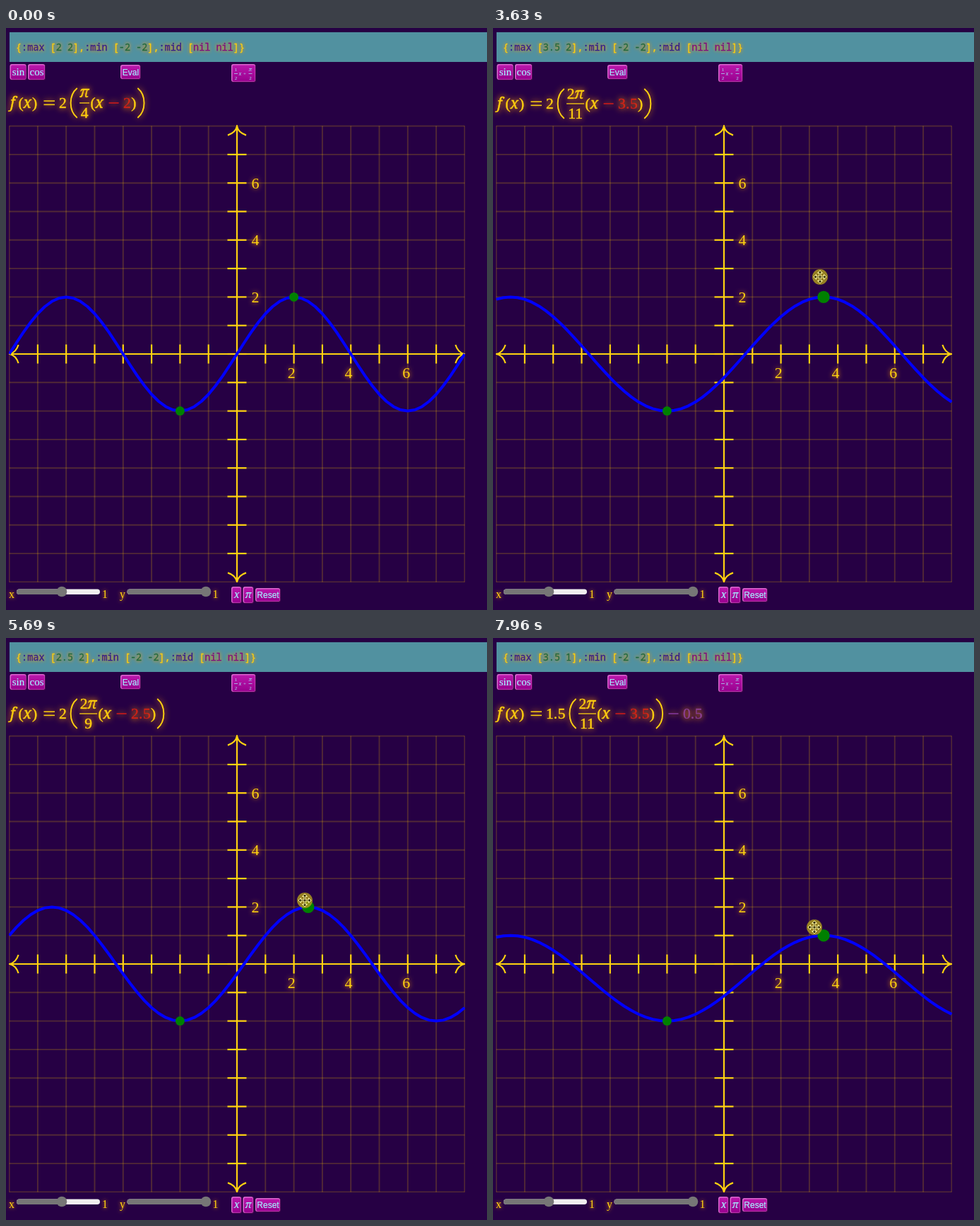
An HTML page with a canvas that plays this animation: 681x823 px, repeating every 8 s.

```html
<!DOCTYPE html>
<html lang="en">
<head>
<meta charset="utf-8">
<title>Sine fitting</title>
<style>
html, body { margin: 0; width: 100%; height: 100%; overflow: hidden; background: #260044; }
canvas { display: block; }
</style>
</head>
<body>
<canvas id="stage" width="681" height="823"></canvas>
<script>
const g = document.getElementById('stage').getContext('2d');
const LOOP = 8000, OX = 327, OY = 461, U = 40.3;
const GOLD = '#ffd310', GLOW = '#ff9a00', RED = '#cc1a1a', PURPLE = '#83389c';
const SERIF = '"Liberation Serif", serif';
const MATH = '21.6px ' + SERIF;
const MATH_IT = 'italic 21px "Noto Serif", serif';
const MIN = { x: -2, y: -2 };
const START = 630, GRAB = 1770, PRESS = 2030, LAG = 70;

// Pointer way points: time, x, y
const PATH = [
  [630, 664, 520], [1310, 453, 398], [1770, 405, 370], [2370, 405, 370],
  [2900, 465, 365], [3290, 468, 360], [3430, 468, 360], [4480, 416, 276],
  [4750, 416, 276], [5690, 423, 371], [6090, 422, 371], [6680, 318, 387],
  [6950, 315, 388], [7960, 455, 409], [8000, 455, 409]
];

function pointer(t) {
  let i = 0;
  while (i < PATH.length - 2 && t >= PATH[i + 1][0]) i++;
  const [t0, x0, y0] = PATH[i], [t1, x1, y1] = PATH[i + 1];
  const u = Math.max(0, Math.min(1, (t - t0) / (t1 - t0)));
  const s = i === 0 ? u : i === 1 ? u * (2 - u) : u * u * (3 - 2 * u);
  return { x: x0 + (x1 - x0) * s, y: y0 + (y1 - y0) * s };
}

function peak(t) {
  if (t < PRESS) return { x: 2, y: 2 };
  const p = pointer(t - LAG);
  const snap = v => Math.round(v * 2) / 2 || 0;
  return { x: snap((p.x - OX) / U + 0.2), y: snap((OY - p.y) / U - 0.38) };
}

const px = x => OX + x * U;
const py = y => OY - y * U;

function glow(blur, color = GLOW) {
  g.shadowBlur = blur;
  g.shadowColor = blur ? color : 'transparent';
}

function text(s, x, y, font, color, align = 'left', heft = 0) {
  g.font = font;
  g.textAlign = align;
  g.fillStyle = color;
  g.fillText(s, x, y);
  if (heft) {
    g.lineWidth = heft;
    g.strokeStyle = color;
    g.strokeText(s, x, y);
  }
}

function line(x0, y0, x1, y1, color, w) {
  g.strokeStyle = color;
  g.lineWidth = w;
  g.beginPath();
  g.moveTo(x0, y0);
  g.lineTo(x1, y1);
  g.stroke();
}

function disc(x, y, r, color) {
  g.fillStyle = color;
  g.beginPath();
  g.arc(x, y, r, 0, 2 * Math.PI);
  g.fill();
}

function round(x, y, w, h, r, color) {
  g.fillStyle = color;
  g.beginPath();
  g.roundRect(x, y, w, h, r);
  g.fill();
}

function header(m) {
  g.fillStyle = '#5191a0';
  g.fillRect(5, 6, 676, 42);
  const parts = [
    ['{', GOLD], [':max ', '#221199'], ['[', GOLD], [`${m.x} ${m.y}`, '#116644'], ['],', GOLD],
    [':min ', '#221199'], ['[', GOLD], ['-2 -2', '#116644'], ['],', GOLD],
    [':mid ', '#221199'], ['[', GOLD], ['nil nil', '#770088'], [']}', GOLD]
  ];
  let x = 14;
  glow(5);
  for (const [s, color] of parts) {
    text(s, x, 32, '13.5px "Noto Sans Mono", monospace', color, 'left', 0.3);
    x += s.length * 8.1;
  }
  glow(0);
}

function button(x, y, w, h) {
  round(x, y, w, h, 3, '#4c0850');
  round(x, y, w - 1, h - 1, 3, '#d969cf');
  const fill = g.createLinearGradient(0, y, 0, y + h);
  fill.addColorStop(0, '#bd18ae');
  fill.addColorStop(1, '#96008d');
  round(x + 1.5, y + 1.5, w - 3, h - 3, 2, fill);
}

function controls() {
  const ink = '#a5efff', serif = '15px ' + SERIF, sans = '12px "Liberation Sans", sans-serif';
  const it = 'italic 14px "Noto Serif", serif';
  const items = [
    ['sin', 5.5, 51, 24, 23, serif, 67], ['cos', 31, 51, 25, 23, serif, 67],
    ['Eval', 162, 52, 29, 21, sans, 67], ['', 319, 51, 35, 26, sans, 67],
    ['x', 319, 790, 15, 24, it, 806], ['π', 335.5, 790, 15.5, 24, it, 806],
    ['Reset', 353, 792, 36, 20, sans, 806]
  ];
  for (const [s, x, y, w, h, font, base] of items) {
    button(x, y, w, h);
    text(s, x + w / 2, base, font, ink, 'center', 0.2);
  }
  const tiny = '7px ' + SERIF, tinyIt = 'italic 7px "Noto Serif", serif';
  text('1', 325.5, 61, tiny, ink, 'center');
  text('2', 325.5, 73, tiny, ink, 'center');
  text('x', 331.5, 67, tinyIt, ink, 'center');
  text('+', 338, 67, tiny, ink, 'center');
  text('π', 346, 61, tinyIt, ink, 'center');
  text('2', 346, 73, tiny, ink, 'center');
  line(323, 64.5, 328, 64.5, ink, 0.7);
  line(343.5, 64.5, 348.5, 64.5, ink, 0.7);

  slider('x', 4, 15, 79);
  slider('y', 161, 171.5, 283);
}

function slider(name, lx, x, knob) {
  glow(5);
  text(name, lx, 806, '16px ' + SERIF, GOLD);
  text('1', x + 121, 806, '16px ' + SERIF, GOLD);
  glow(0);
  round(x, 793.5, 118, 7.5, 4, '#efefef');
  round(x, 793.5, knob - x, 7.5, 4, '#767676');
  disc(knob, 797, 7.3, '#767676');
}

function bigParen(x, mid, dir) {
  const a = dir > 0 ? x + 10 : x + 1, c = dir > 0 ? x - 2.2 : x + 13.2;
  g.strokeStyle = GOLD;
  g.lineWidth = 1.9;
  g.beginPath();
  g.moveTo(a, mid - 21);
  g.bezierCurveTo(c, mid - 11, c, mid + 11, a, mid + 21);
  g.stroke();
}

function formula(m) {
  const n = 2 * (m.x - MIN.x), whole = n % 2 === 0;
  const den = whole ? n / 2 : n;
  const amp = (m.y - MIN.y) / 2, mid = (m.y + MIN.y) / 2;
  const cy = whole ? 105.5 : 106.5, base = cy + 7;
  let x = 75;

  const put = (s, at, color = GOLD, font = MATH) => text(s, at, base, font, color, 'left', 0.45);
  const num = (v, color = GOLD) => {
    for (const c of String(v)) {
      put(c, x, color);
      x += c === '.' ? 6 : 10.8;
    }
  };
  const sign = (plus, color) => {
    line(x, cy + 0.5, x + 14, cy + 0.5, color, 1.6);
    if (plus) line(x + 7, cy - 6.5, x + 7, cy + 7.5, color, 1.6);
    x += 20.5;
  };

  glow(8);
  put('f', 6, GOLD, MATH_IT);
  put('(', 17.5);
  put('x', 24.5, GOLD, MATH_IT);
  put(')', 37);
  line(53.5, cy - 2.3, 69, cy - 2.3, GOLD, 1.5);
  line(53.5, cy + 2.9, 69, cy + 2.9, GOLD, 1.5);
  num(amp);

  x += 5;
  bigParen(x, cy + 0.5, 1);
  x += 13.3;
  const w = whole ? 14 : 25, c = x + w / 2;
  if (whole) {
    text('π', c, cy - 8, MATH_IT, GOLD, 'center', 0.45);
  } else {
    text('2', x + 6, cy - 7, MATH, GOLD, 'center', 0.45);
    text('π', x + 18, cy - 7, MATH_IT, GOLD, 'center', 0.45);
  }
  text(den, c, cy + 21, MATH, GOLD, 'center', 0.45);
  line(x, cy + 0.5, x + w, cy + 0.5, GOLD, 1.3);
  x += w + 1.3;

  if (m.x) {
    put('(', x);
    x += 7;
  }
  put('x', x, GOLD, MATH_IT);
  x += 12.7;
  if (m.x) {
    x += 6.5;
    sign(m.x < 0, RED);
    num(Math.abs(m.x), RED);
    put(')', x + 0.3);
    x += 8.5;
  }
  bigParen(x, cy + 0.5, -1);
  x += 18.5;
  if (mid) {
    sign(mid > 0, PURPLE);
    num(Math.abs(mid), PURPLE);
  }
  glow(0);
}

function arrow(x, y, turn) {
  g.save();
  g.translate(x, y);
  g.rotate(turn * Math.PI / 2);
  g.beginPath();
  g.moveTo(-13, 13);
  g.quadraticCurveTo(-2, 9.5, 0, 0.5);
  g.quadraticCurveTo(2, 9.5, 13, 13);
  g.stroke();
  g.restore();
}

function axes() {
  const end = 8 * U;
  for (let i = -8; i <= 8; i++) {
    line(px(i), OY - end, px(i), OY + end, 'rgba(255,205,0,.2)', 1.9);
    line(OX - end, py(i), OX + end, py(i), 'rgba(255,205,0,.2)', 1.9);
  }
  line(OX - end + 1, OY, OX + end - 1, OY, GOLD, 2.2);
  line(OX, OY - end + 1, OX, OY + end - 1, GOLD, 2.2);
  for (let i = -7; i <= 7; i++) {
    if (i) line(px(i), OY - 13.5, px(i), OY + 13.5, GOLD, 2.2);
    line(OX - 13.5, py(i), OX + 13.5, py(i), GOLD, 2.2);
  }
  g.lineWidth = 2.2;
  g.strokeStyle = GOLD;
  arrow(OX, OY - end, 0);
  arrow(OX + end, OY, 1);
  arrow(OX, OY + end, 2);
  arrow(OX - end, OY, 3);
  glow(6);
  for (const n of [2, 4, 6]) {
    text(n, px(n) - (n === 6 ? 2 : 3.3), 495, '22px ' + SERIF, GOLD, 'center');
    text(n, 353, py(n) + 7.5, '22px ' + SERIF, GOLD, 'center');
  }
  glow(0);
}

function curve(m) {
  const amp = (m.y - MIN.y) / 2, mid = (m.y + MIN.y) / 2, half = m.x - MIN.x;
  g.strokeStyle = '#0000ff';
  g.lineWidth = 4;
  g.lineJoin = 'round';
  g.beginPath();
  for (let x = -8; x <= 8; x += 0.25)
    g.lineTo(px(x), py(mid + amp * Math.cos(Math.PI * (x - m.x) / half)));
  g.stroke();
}

function outline(points, fill, edge) {
  g.beginPath();
  for (const [x, y] of points) g.lineTo(x, y);
  g.closePath();
  g.fillStyle = fill;
  g.fill();
  g.strokeStyle = edge;
  g.lineWidth = 1;
  g.stroke();
}

function mouse(t) {
  if (t < START) return;
  const p = pointer(t);
  g.save();
  g.translate(p.x, p.y);
  if (t < GRAB) {
    outline([[0.5, 0.5], [0.5, 13.5], [3.5, 10.8], [6, 15.5], [8, 14.5], [6, 9.8], [10, 9.5]], '#000', '#fff');
  } else {
    if (t >= PRESS) disc(0, 0, 11, 'rgba(170,150,30,.85)');
    const arm = [[-1, -1], [-1, -5.5], [-3.5, -5.5], [0, -9], [3.5, -5.5], [1, -5.5]];
    const shape = [];
    for (let k = 0; k < 4; k++) {
      const c = Math.round(Math.cos(k * Math.PI / 2)), s = Math.round(Math.sin(k * Math.PI / 2));
      for (const [x, y] of arm) shape.push([x * c - y * s, x * s + y * c]);
    }
    outline(shape, '#3a3208', '#fff8a0');
  }
  g.restore();
}

function draw(t) {
  const m = peak(t);
  g.fillStyle = '#260044';
  g.fillRect(0, 0, 681, 823);
  header(m);
  controls();
  formula(m);
  g.save();
  g.beginPath();
  g.rect(4, 137, 646, 647);
  g.clip();
  axes();
  curve(m);
  disc(px(MIN.x), py(MIN.y), 6.5, '#008000');
  disc(px(m.x), py(m.y), t >= GRAB ? 8.7 : 6.5, '#008000');
  g.restore();
  mouse(t);
}

const begin = performance.now();
function tick() {
  draw((performance.now() - begin) % LOOP);
  requestAnimationFrame(tick);
}
tick();
</script>
</body>
</html>
```
